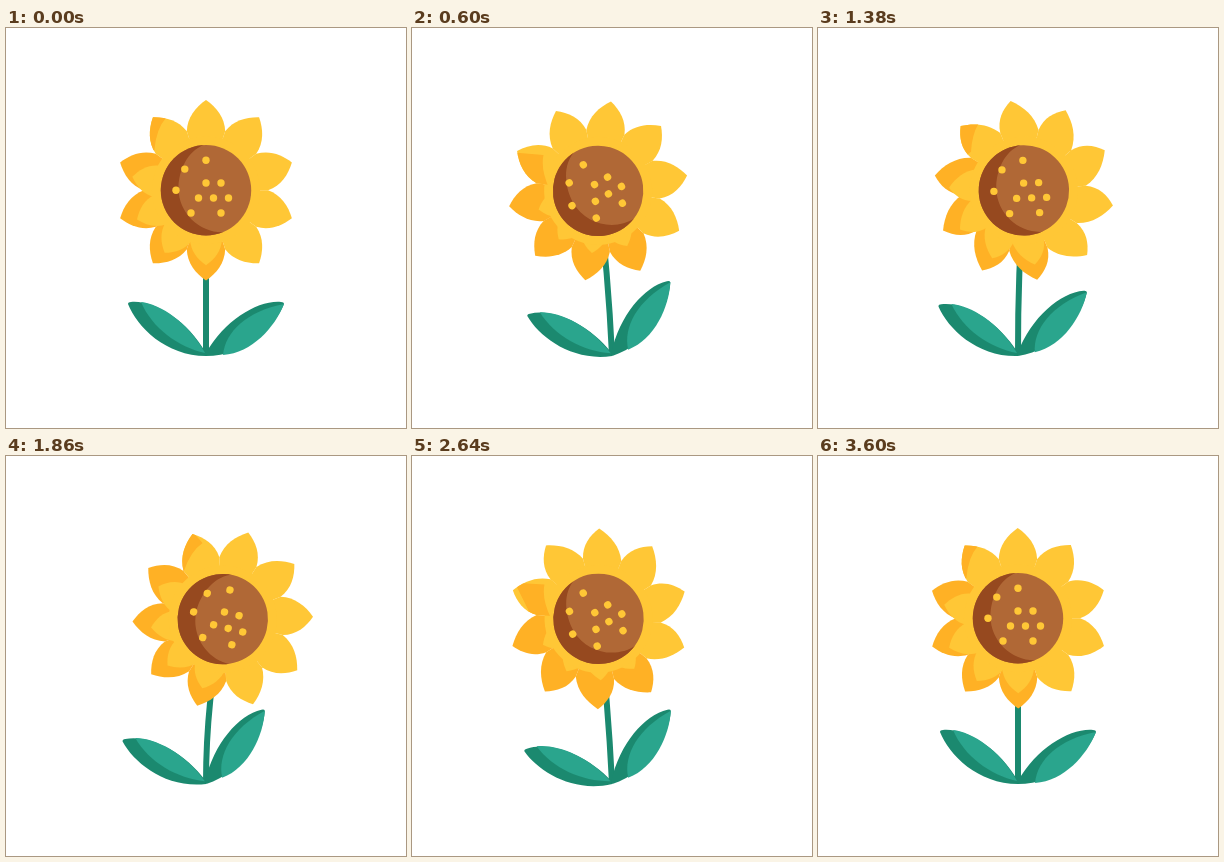
Animation, 400 px wide and 400 px high, one loop 5.63 s. Source, as an HTML page:

```html
<!DOCTYPE html>
<html lang="en">
<head>
<meta charset="utf-8">
<title>Swaying sunflower</title>
<style>
  html, body { margin: 0; width: 100%; height: 100%; overflow: hidden; background: #fff; }
  svg { display: block; width: 100vw; height: 100vh; }
  .gold { fill: #ffc736; }
  .amber { fill: #ffb125; }
  .green { fill: #2aa58d; }
  .pine { fill: #1b896f; }
</style>
</head>
<body>
<svg viewBox="0 0 400 400">
  <defs>
    <path id="petal"/>
    <clipPath id="inPetal"><use href="#petal"/></clipPath>
    <clipPath id="inDisc"><circle r="45.2"/></clipPath>
    <path id="leaf" d="M122 276Q122 274 125 274C148 272 181 292 200 325V328C160 328 131 299 122 276Z"/>
  </defs>
  <path id="stem" fill="none" stroke="#1b896f" stroke-width="6"/>
  <g id="left">
    <use href="#leaf" class="pine"/>
    <path class="green" d="M135 274C154 276 182 294 199 325C172 319 146 300 135 274Z"/>
  </g>
  <g id="right">
    <use href="#leaf" class="pine" transform="matrix(-1 0 0 1 400 0)"/>
    <path class="green" d="M278 276C269 299 246 325 217 327C219 304 241 283 278 276Z"/>
  </g>
  <g id="head">
    <g id="petals"></g>
    <g transform="rotate(-36)"><g clip-path="url(#inPetal)">
      <path id="edge" class="amber" d="M10 -82Q-4 -79 -18 -63H-40L0 -110Z"/>
    </g></g>
    <circle r="45.2" fill="#b06836"/>
    <path clip-path="url(#inDisc)" fill="#96491f" d="M0 -46C-18 -41 -27.5 -20 -27.5 -2C-27.5 23 -6 43 18 42L0 60L-60 40V-50Z"/>
    <g id="seeds"></g>
  </g>
</svg>
<script>
const LOOP = 5630, MOVE = 3600, STEP = 30;
const RAD = Math.PI / 180;
const $ = id => document.getElementById(id);

function add(parent, tag, attrs) {
  const el = document.createElementNS('http://www.w3.org/2000/svg', tag);
  for (const k in attrs) el.setAttribute(k, attrs[k]);
  $(parent).append(el);
  return el;
}

const addPetal = (cls, angle) =>
  add('petals', 'use', { href: '#petal', class: cls, transform: `rotate(${angle})` });

// The four lower left petals are shaded, each with a smaller light petal on top
const shaded = [0, 1, 2, 3].map(i => 180 + 36 * i);
for (const a of shaded) addPetal('amber', a);
for (let i = -1; i < 5; i++) addPetal('gold', 36 * i);
const inner = shaded.map((a, i) => ({ angle: a - 2.5 * i, el: addPetal('gold', a) }));
add('petals', 'circle', { r: 54, class: 'gold' });

// Seeds: an arc at the upper left and three centred rows
const addSeed = (cx, cy) => add('seeds', 'circle', { cx, cy, r: 3.7, class: 'gold' });
for (let i = 0; i < 3; i++) addSeed(-30 * Math.sin(i * 45 * RAD), -30 * Math.cos(i * 45 * RAD));
[[0, 15], [-7.5, 22.5], [-15, 15]].forEach(([from, to], row) => {
  const gap = row === 2 ? 30 : 15;
  for (let x = from; x <= to; x += gap) addSeed(x, 15 * row - 7.3);
});

// Eases between poses, at rest in each of them
function sway(t, times, poses) {
  if (t <= 0) return 0;
  let i = 0;
  while (i < times.length && t >= times[i]) i++;
  if (i === times.length) return 0;
  const t0 = times[i - 1] || 0, a = poses[i - 1] || 0, b = poses[i] || 0;
  const u = (t - t0) / (times[i] - t0);
  return a + (b - a) * u * u * (3 - 2 * u);
}

const headTimes = [750, 1800, 2460, 3560];
const shift = t => sway(t, headTimes, [-15.5, 17.5, -14.5]);
const spin = t => sway(t, headTimes, [-33, 15, -33]);
const leftLeaf = t => sway(t, [750, 1500, 2370, 3400], [-9.5, -1.2, -16]);
const rightLeaf = t => sway(t, [720, 1290, 2300, 3330], [-19.5, -8.8, -23.7]);

// Petal outline, twisted more towards the tip
function petalPath(twist) {
  const at = (x, y) => {
    const a = twist * RAD * Math.max(0, (Math.hypot(x, y) - 45) / 45);
    const c = Math.cos(a), s = Math.sin(a);
    return `${x * c - y * s} ${x * s + y * c} `;
  };
  return 'M0 0L' + at(-19.2, -59) + 'C' + at(-18.7, -73) + at(-10.5, -83) + at(0, -90.3)
    + 'C' + at(10.5, -83) + at(18.7, -73) + at(19.2, -59) + 'Z';
}

function draw(now) {
  const t = Math.min(MOVE, Math.floor(now % LOOP / STEP) * STEP);
  const move = (el, value) => el.setAttribute('transform', value);
  const dx = shift(t), turn = spin(t);
  const x = 200 + dx, y = 162.3 + dx * dx * .003;
  const bend = 200 + .13 * Math.min(0, turn);
  const lean = .02 * turn * turn;

  move($('head'), `translate(${x} ${y}) rotate(${turn})`);
  // petal tips trail behind the disc and swing a little further
  $('petal').setAttribute('d', petalPath(1.1 * spin(t - 85) - turn));
  // the shade widens as the head leans
  move($('edge'), `translate(0 ${lean})`);
  for (const { el, angle } of inner) move(el, `rotate(${angle}) scale(${.83 - .008 * lean})`);

  $('stem').setAttribute('d', `M200 327Q${bend} 245 ${x} ${y}`);
  move($('left'), `rotate(${leftLeaf(t)} 200 327)`);
  move($('right'), `rotate(${rightLeaf(t)} 200 327)`);
}

const start = performance.now();
function tick() {
  draw(performance.now() - start);
  requestAnimationFrame(tick);
}
tick();
</script>
</body>
</html>
```
